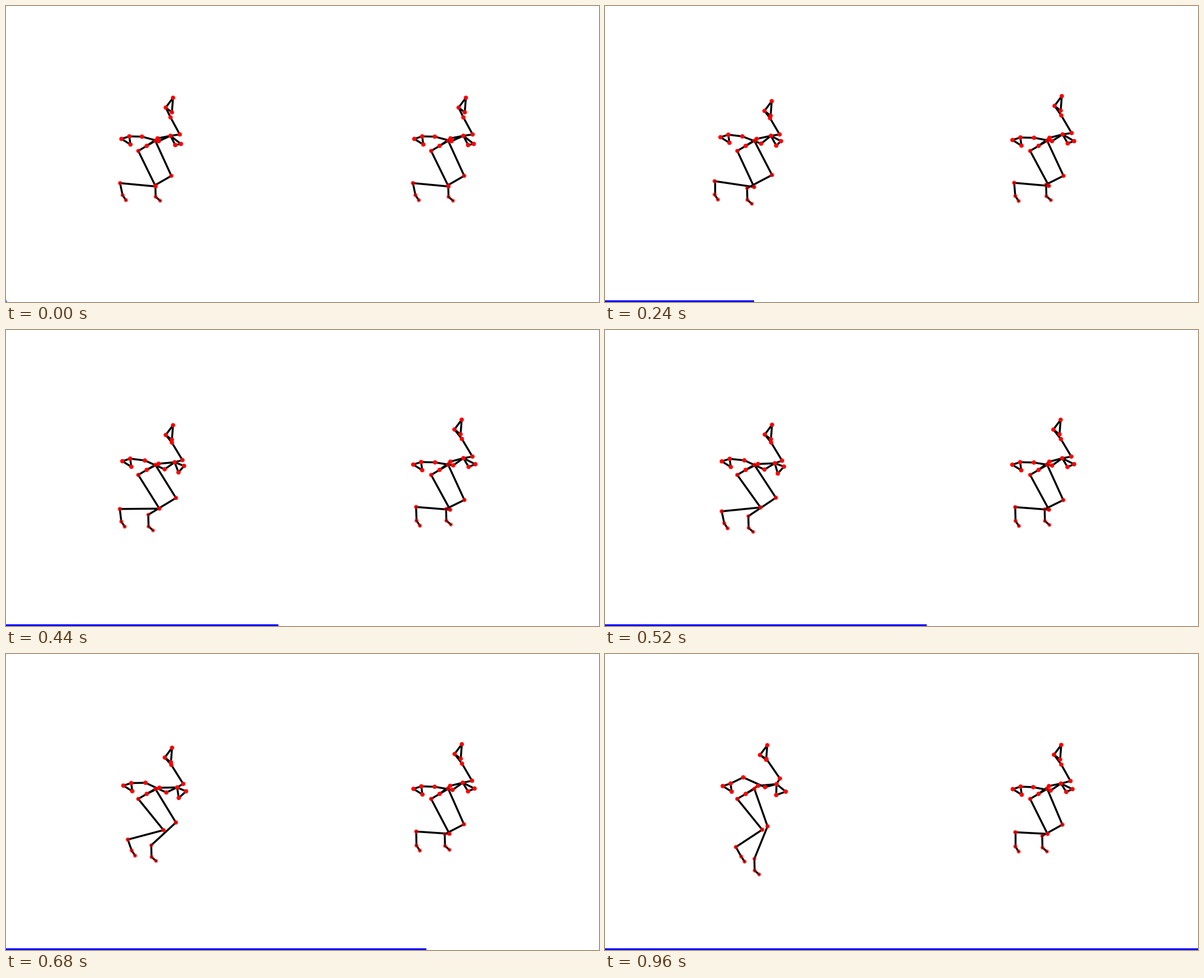
Recreate the animation shown at these times as a matplotlib script. Size 1058 px wide and 529 px high, loop 1 s.

```python
import numpy as np
import matplotlib.pyplot as plt
from matplotlib.animation import FuncAnimation
from matplotlib.collections import LineCollection
from matplotlib.patches import Rectangle

W, H, DPI = 1058, 529, 100
FRAMES, INTERVAL = 25, 40
SHIFT = np.array([522.5, 0])        # from the left figure to the right one
LIVELY = [0, 6, 15, 24]             # frames where the left figure passes its waypoints
CALM = [0, 6, 24]                   # the same for the right figure
STILL = (0, 0)


def glide(keys, points):
    """Smooth path through the waypoints, one point per frame."""
    t, v = np.array(keys, float), np.array(points, float)
    slope = np.gradient(v, t, axis=0)
    f = np.arange(FRAMES)
    k = np.clip(np.searchsorted(t, f, side="right") - 1, 0, len(t) - 2)
    h = (t[k + 1] - t[k])[:, None]
    u = (f - t[k])[:, None] / h
    ease = u * u * (3 - 2 * u)
    return (v[k] + (v[k + 1] - v[k]) * ease
            + h * u * (1 - u) * ((1 - u) * slope[k] - u * slope[k + 1]))


names, alphas, left, right = [], [], [], []


def part(alpha, path=(STILL,) * 3, drift=(STILL,) * 2, **joints):
    """Joints that move together: path on the left figure, drift on the right."""
    swing = glide(LIVELY, [STILL, *path])
    sway = glide(CALM, [STILL, *drift])
    for name, start in joints.items():
        names.append(name)
        alphas.append(alpha)
        left.append(start + swing)
        right.append(start + SHIFT + sway)


# hips and trunk
part(0.95, root=(251, 250))
part(0.7, hip_l=(236, 259), hip_r=(266.5, 241))
part(0.95, [(0, 1), (3, 3), (2.5, -1)], [(0, -1), (-1, -.5)], spine=(270.5, 236.5))
part(1, [(2.5, 0), (11, 7), (12.5, .5)], [(.5, -2.5), (-2.5, -.5)], chest=(293.5, 232))

# raised limb
part(0.95, [(1.5, 0), (6.5, 4), (2, -7)], [(0, -2.5), (-2, -2.5)], bend=(310, 229.5))
part(0.92, [(1, 1.5), (2.5, 1), (-5.5, -11.5)], [(-2, -3.5), (-2, -1.5)], neck=(293.5, 199))
part(0.9, [(-.5, 6), (-.5, 4.5), (-8.5, -1)], [(-5.5, -3), (-6.5, -1.5)],
     low=(296, 190), side=(285, 181.5), top=(298, 164))

# stretched arm
part(0.95, [(6, 4.5), (13, 7.5), (13, -3.5)], [(2.5, 0), (0, 2.5)], shoulder=(272.5, 241.5))
part(0.98, [(2.5, -.5), (6.5, -1.5), (4, -13)], [(.5, 2), (-1, 4.5)], elbow=(242.5, 233.5))
part(0.98, [(0, -3), (3, -2.5), (4, -1.5)], [(-1.5, 2), (-1, 4)],
     wrist=(220, 233), tip=(206, 237.5), thumb=(222, 247.5))

# small triangle beside the chest
part(1, [(3.5, 1), (6.5, 9), (3.5, 3.5)], [(1, -3), (-1.5, -2)], near=(302, 248.5))
part(1, [(2, -5), (8.5, -1.5), (10.5, -.5)], [(2.5, -5), (-.5, -5)], far=(312, 246.5))

# legs
part(0.74, [(-1, 1), (13, -7), (13.5, -8.5)], [(2.5, -1), (0, -1)], knee_l=(267, 322.5))
part(0.65, [(-8, -3.5), (9.5, 11.5), (30, 28.5)], [(4, -.5), (6, 2)], ankle_l=(203.5, 316.5))
part(0.5, [(-12.5, -1), (11, 10.5), (35, 24)], [(1.5, 1.5), (1.5, 6)],
     heel_l=(208, 338), toe_l=(214, 347))
part(0.72, [(3, -1.5), (10, -3.5), (-5, 4.5)], [(.5, 0), (-1.5, 1.5)], knee_r=(295, 303.5))
part(0.42, [(-13, 5.5), (-9, 16.5), (0, 46)], [(-2, -1), (-9, 5)],
     ankle_r=(266.5, 320), heel_r=(267, 341), toe_r=(275, 348))

CHAINS = [
    "root hip_l knee_l ankle_l heel_l toe_l",
    "root hip_r knee_r ankle_r heel_r toe_r",
    "root spine chest bend neck side top low side",
    "chest shoulder elbow wrist tip thumb wrist",
    "chest near far chest",
]
bones = [(names.index(a), names.index(b)) for c in CHAINS
         for a, b in zip(c.split(), c.split()[1:])]

order = np.argsort(alphas, kind="stable")      # faint joints first
reds = [(1, 0, 0, alphas[j]) for j in order]

fig = plt.figure(figsize=(W / DPI, H / DPI), dpi=DPI, facecolor="white")
ax = fig.add_axes([0, 0, 1, 1])
ax.set_xlim(0, W)
ax.set_ylim(H, 0)
ax.axis("off")

bar = ax.add_patch(Rectangle((0, H - 2.7), 1, 2.7, color="blue", lw=0))
figures = []
for pose in (np.array(left), np.array(right)):
    limbs = LineCollection([], colors="black", linewidths=2.5,
                           capstyle="projecting", zorder=2)
    ax.add_collection(limbs, autolim=False)
    dots = ax.scatter(*pose[order, 0].T, s=17, c=reds,
                      edgecolors="face", linewidths=1.5, zorder=3)
    figures.append((pose, limbs, dots))


def draw(i):
    bar.set_width(W * i / (FRAMES - 1) + 1)
    for pose, limbs, dots in figures:
        pts = pose[:, i]
        limbs.set_segments([pts[[a, b]] for a, b in bones])
        dots.set_offsets(pts[order])
    return [bar] + [a for f in figures for a in f[1:]]


anim = FuncAnimation(fig, draw, frames=FRAMES, interval=INTERVAL,
                     repeat=True, repeat_delay=0, blit=False)
plt.show()
```
